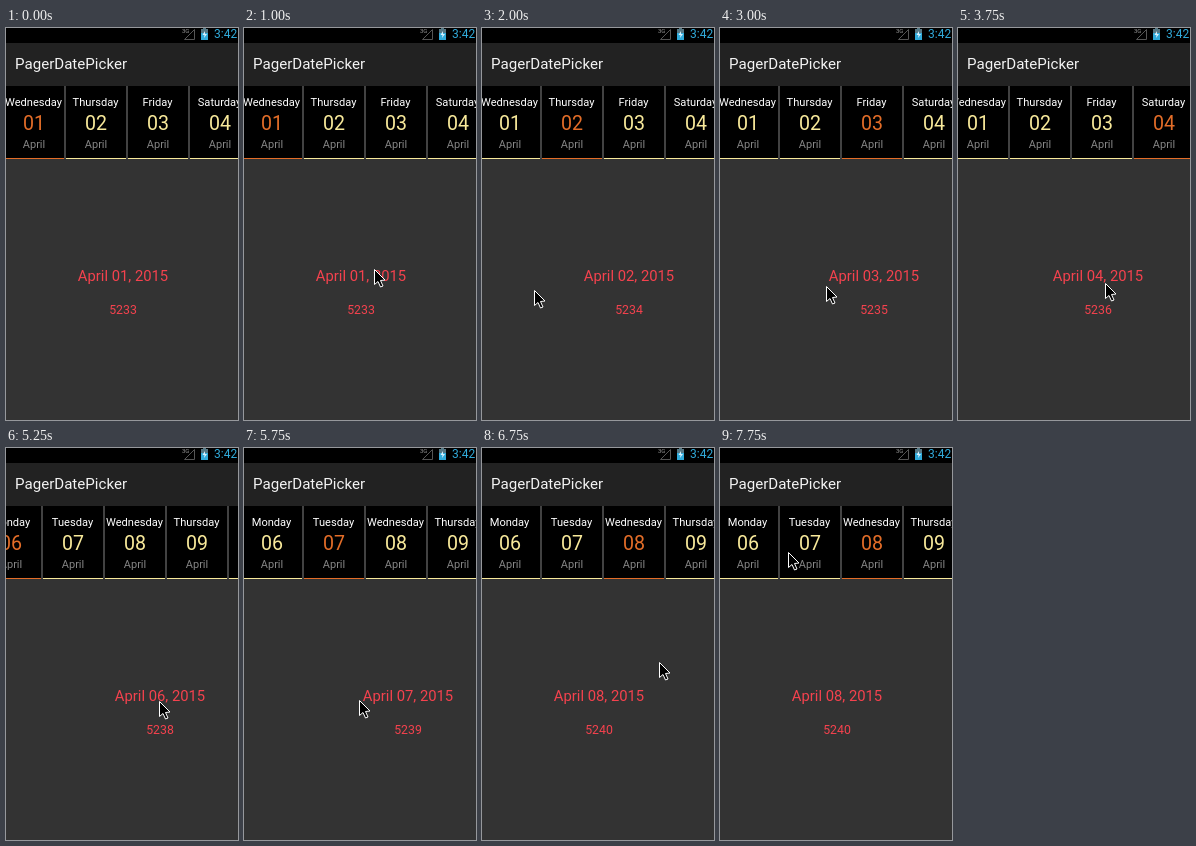
An HTML page with a canvas for the animation above (8000 ms loop, 232x392 px).

```html
<!DOCTYPE html>
<html lang="en">
<head>
<meta charset="utf-8">
<title>PagerDatePicker</title>
<style>
html, body { margin: 0; width: 100%; height: 100%; overflow: hidden; background: #333; }
canvas { display: block; }
</style>
</head>
<body>
<canvas id="stage" width="232" height="392"></canvas>
<script>
const ctx = document.getElementById('stage').getContext('2d');
const WIDTH = 232, HEIGHT = 392, ITEM = 62, STEP = 250, STEPS = 32;
const ORANGE = '#e36d28', YELLOW = '#f8e99a', BLUE = '#31abdb', RED = '#f5424e';
const DAYS = ['Wednesday', 'Thursday', 'Friday', 'Saturday', 'Sunday', 'Monday', 'Tuesday'];

// All times are in steps; a glide lasts two steps and slows into its end.
const SWIPE_ENDS = [8.72, 12.8, 15.63, 18.8, 21.8, 23.9, 26.5];
const SCROLLS = [{ end: 16.31, by: 14 }, { end: 19, by: 387 }, { end: 22, by: -91 }];
const POINTER = [[1, 218, 178], [3, 150, 235], [8, 52, 261], [15, 147, 254],
  [19, 190, 252], [23, 115, 251], [27, 177, 213], [31, 68, 103]];

function glide(step, end) {
  const left = Math.min(1, Math.max(0, (end - step) / 2));
  return 1 - left * left;
}

const pageAt = step => SWIPE_ENDS.reduce((sum, end) => sum + glide(step, end), 0);
const scrollAt = step => SCROLLS.reduce((sum, s) => sum + s.by * glide(step, s.end), 0);

function pointerAt(step) {
  const next = Math.max(1, POINTER.findIndex(key => key[0] >= step));
  const [t0, x0, y0] = POINTER[next - 1], [t1, x1, y1] = POINTER[next];
  const k = (step - t0) / (t1 - t0);
  return [Math.round(x0 + (x1 - x0) * k), Math.round(y0 + (y1 - y0) * k)];
}

function rect(x, y, w, h, color) {
  ctx.fillStyle = color;
  ctx.fillRect(x, y, w, h);
}

function text(str, x, y, size, color, align = 'center') {
  ctx.font = `${size}px Roboto, sans-serif`;
  ctx.textAlign = align;
  ctx.fillStyle = color;
  ctx.fillText(str, x, y);
}

function shape(path, fill, stroke) {
  const outline = new Path2D(path);
  if (fill) { ctx.fillStyle = fill; ctx.fill(outline); }
  if (stroke) { ctx.strokeStyle = stroke; ctx.stroke(outline); }
}

const twoDigits = n => String(n).padStart(2, '0');

function drawHeader() {
  rect(0, 0, WIDTH, 15, '#000');
  rect(0, 15, WIDTH, 43, '#222');
  text('PagerDatePicker', 9, 41, 15.1, '#f3f3f3', 'left');
  text('3G', 176, 5, 6, '#999', 'left');
  shape('M178.5 11.5h10v-10z', null, '#555');
  rect(197, 0, 3, 2, '#557784');
  rect(195, 1, 7, 4, '#557784');
  rect(195, 5, 7, 7, BLUE);
  shape('M199 3l-2.5 4h2l-.5 3 3-4h-2z', '#d8f2ff');
  text('3:42', 208, 10, 12, BLUE, 'left');
}

function drawStrip(offset, selected) {
  rect(0, 58, WIDTH, 73, '#000');
  const first = Math.floor(offset / ITEM);
  for (let i = first; i < first + 6; i++) {
    const x = 28 + i * ITEM - offset;
    const color = i === selected ? ORANGE : YELLOW;
    text(DAYS[i % 7], x - .5, 78, 11.1, '#fff');
    text(twoDigits(i + 1), x, 102, 19.6, color);
    text('April', x, 120, 11, '#858585');
    rect(x - 30, 130, 60, 1, color);
    rect(x + 30, 58, 2, 73, '#424242');
  }
}

function drawPages(position) {
  for (let i = Math.floor(position); i <= Math.ceil(position); i++) {
    const x = 117 + Math.round((i - position) * WIDTH);
    text(`April ${twoDigits(i + 1)}, 2015`, x, 253, 14.8, RED);
    text(5233 + i, x, 286, 12.3, RED);
  }
}

function drawPointer(x, y) {
  ctx.save();
  ctx.translate(x + .5, y + 1.5);
  shape('M0 0v15l3.5-3 2.5 5.5 2.5-1-2.5-5.5 4.5-.5z', '#000', '#fff');
  ctx.restore();
}

function frame(now) {
  const step = Math.floor(now / STEP) % STEPS;
  const position = pageAt(step);
  rect(0, 131, WIDTH, HEIGHT - 131, '#333');
  drawHeader();
  drawStrip(Math.round(scrollAt(step)), Math.round(position));
  drawPages(position);
  if (step > 0) drawPointer(...pointerAt(step));
  requestAnimationFrame(frame);
}

requestAnimationFrame(frame);
</script>
</body>
</html>
```
